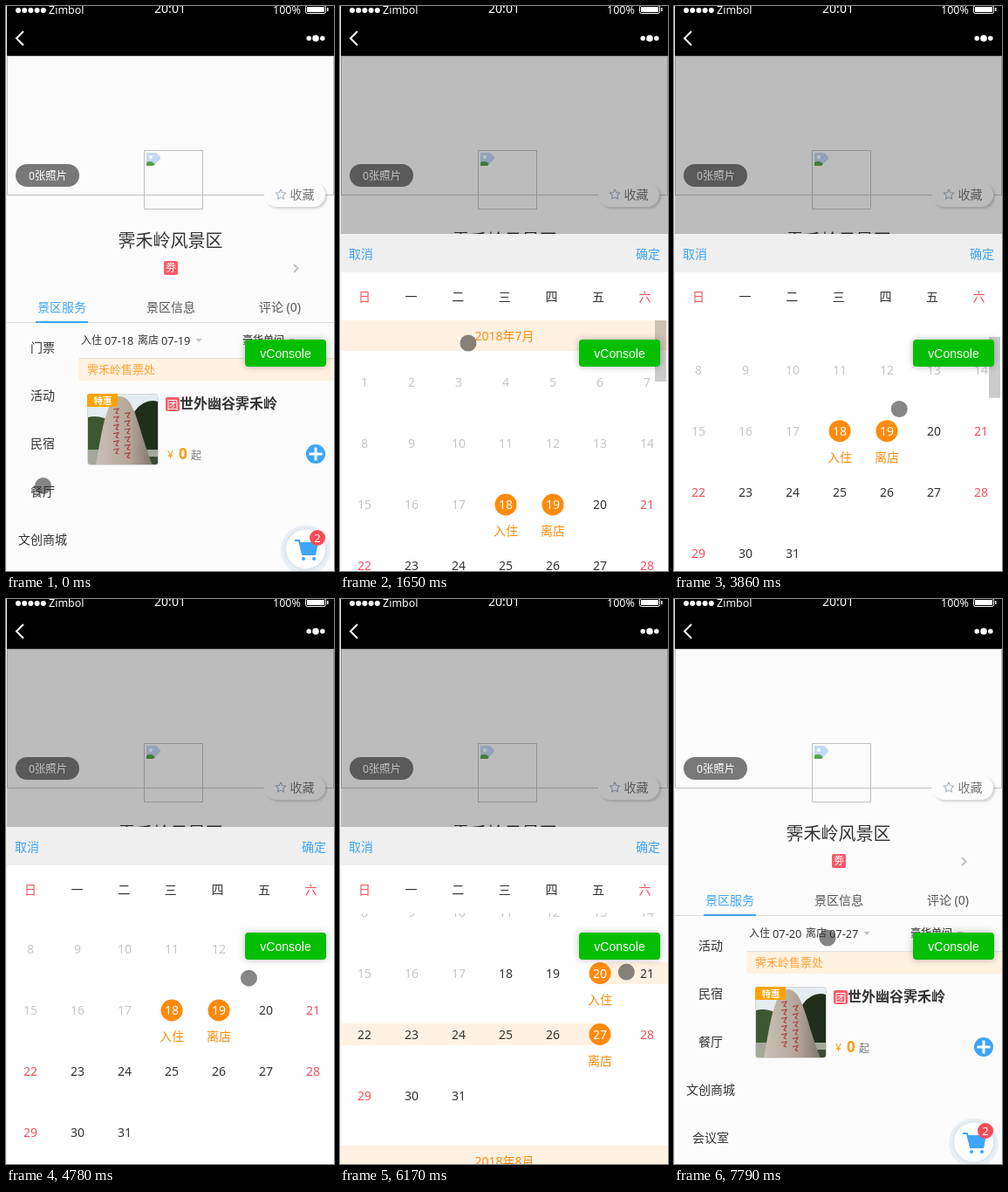
An HTML page with a canvas for the animation above (8 s loop, 376 by 647 pixels).

```html
<!DOCTYPE html>
<html lang="zh">
<head>
<meta charset="utf-8">
<style>
html, body { margin: 0; width: 100%; height: 100%; overflow: hidden; background: #fbfbfb; }
canvas { display: block; }
</style>
</head>
<body>
<canvas id="stage" width="376" height="647"></canvas>
<script>
const W = 376, H = 647, LOOP = 8000;
const OPEN = 1650, CLOSE = 7210, PICK_START = 5084, PICK_END = 5540;
const c = document.getElementById('stage').getContext('2d');
const SANS = '"Noto Sans", "Noto Sans CJK SC", "Noto Sans CJK", sans-serif';
const BLUE = '#3ea5fa', ORANGE = '#ff8a0c', RED = '#f4505a', PEACH = '#fff1e2', PAGE = '#fbfbfb';

// Each move: start and end time, then the place reached
const moves = [
  { from: 140, to: 560, at: [44, 498] },
  { from: 560, to: 1100, at: [147, 386] },
  { from: 2072, to: 2890, at: [177, 571] },
  { from: 2890, to: 3310, at: [262, 578] },
  { from: 3450, to: 4500, at: [256, 393] },
  { from: 4640, to: PICK_START, at: [298, 470] },
  { from: 5236, to: PICK_END, at: [302, 540] },
  { from: PICK_END, to: 5810, at: [304, 585] },
  { from: 5810, to: 6930, at: [349, 293] },
  { from: 7350, to: 7790, at: [176, 388] },
];

const easeOut = p => 1 - (1 - p) ** 2;
const progress = (t, from, to) => easeOut(Math.min(1, Math.max(0, (t - from) / (to - from))));

const pointerAt = t => moves.reduce(([x, y], m) => {
  const p = progress(t, m.from, m.to);
  return [x + (m.at[0] - x) * p, y + (m.at[1] - y) * p];
}, [42.5, 549.5]);
const menuScroll = t => 49 * progress(t, 140, 640);
const monthScroll = t => 100 * progress(t, 3450, 4130) + 50 * progress(t, 5810, 6400);

function text(s, x, y, size, color, align = 'left', weight = 400, family = SANS) {
  c.font = `${weight} ${size}px ${family}`;
  c.textAlign = align;
  c.fillStyle = color;
  c.fillText(s, x, y + size * 0.37);
}
const label = (s, x, y, color = '#333', size = 14) => text(s, x, y, size, color, 'center');

function rect(x, y, w, h, color) {
  c.fillStyle = color;
  c.fillRect(x, y, w, h);
}
function round(x, y, w, h, r, color) {
  c.beginPath();
  c.roundRect(x, y, w, h, r);
  c.fillStyle = color;
  c.fill();
}
function oval(x, y, rx, ry, color) {
  c.beginPath();
  c.ellipse(x, y, rx, ry, 0, 0, Math.PI * 2);
  c.fillStyle = color;
  c.fill();
}
const disc = (x, y, r, color) => oval(x, y, r, r, color);

function poly(points, color) {
  c.beginPath();
  points.forEach(([x, y]) => c.lineTo(x, y));
  c.fillStyle = color;
  c.fill();
}
function line(points, color, width = 1) {
  c.beginPath();
  points.forEach(([x, y]) => c.lineTo(x, y));
  c.strokeStyle = color;
  c.lineWidth = width;
  c.stroke();
}
function frameBox(x, y, w, h, color, r = 0) {
  c.beginPath();
  c.roundRect(x + 0.5, y + 0.5, w - 1, h - 1, r);
  c.strokeStyle = color;
  c.lineWidth = 1;
  c.stroke();
}
function raised(color, blur, offset, draw) {
  c.save();
  c.shadowColor = color;
  c.shadowBlur = blur;
  c.shadowOffsetX = c.shadowOffsetY = offset;
  draw();
  c.restore();
}
function clipped(x, y, w, h, draw) {
  c.save();
  c.beginPath();
  c.rect(x, y, w, h);
  c.clip();
  draw();
  c.restore();
}
function chevron(x, y, w, h, color, width) {
  line([[x + w, y - h], [x, y], [x + w, y + h]], color, width);
}

function topBar() {
  rect(0, 0, W, 57, '#000');
  for (let i = 0; i < 5; i++) disc(14 + i * 7.2, 5, 3, '#fff');
  text('Zimbol', 49, 4, 12.5, '#fff');
  label('20:01', 188, 3, '#fff');
  text('100%', 306, 4, 12.5, '#fff');
  frameBox(343, -1, 24, 10, '#fff', 2);
  rect(345, 1, 20, 6, '#fff');
  rect(368, 2, 1.5, 4, '#fff');
  chevron(12, 37, 8, 8, '#fff', 2);
  for (let i = -1; i <= 1; i++) disc(355 + i * 7.8, 37, i ? 2.8 : 3.8, '#fff');
}

function brokenImage() {
  frameBox(158, 165, 68, 68, '#c0c0c0');
  clipped(161, 168, 16, 15, () => {
    rect(161, 168, 16, 15, '#c4d8f5');
    disc(166, 173, 2, '#fff');
    oval(165, 183, 6, 5, '#55a548');
    poly([[172, 168], [177, 168], [177, 173]], PAGE);
    poly([[177, 175], [177, 183], [169, 183]], PAGE);
  });
}

function star(x, y, r) {
  c.beginPath();
  for (let i = 0; i < 10; i++) {
    const a = -Math.PI / 2 + i * Math.PI / 5, k = i % 2 ? r * 0.5 : r;
    c.lineTo(x + k * Math.cos(a), y + k * Math.sin(a));
  }
  c.closePath();
  c.strokeStyle = '#a3b3c8';
  c.lineWidth = 1.1;
  c.stroke();
}

function photo() {
  clipped(94, 445, 80, 80, () => {
    rect(93, 444, 82, 82, '#e4ecf0');
    oval(102, 492, 26, 22, '#3c5732');
    oval(168, 490, 28, 38, '#202f1c');
    rect(93, 508, 82, 18, '#a3a89a');
    oval(168, 528, 26, 12, '#3b4a32');
    const stone = c.createLinearGradient(105, 0, 168, 0);
    stone.addColorStop(0, '#c9bfb3');
    stone.addColorStop(0.6, '#b3a498');
    stone.addColorStop(1, '#7f766d');
    c.beginPath();
    c.moveTo(103, 526);
    c.bezierCurveTo(108, 500, 114, 447, 130, 447);
    c.bezierCurveTo(148, 447, 150, 480, 168, 526);
    c.fillStyle = stone;
    c.fill();
    for (let i = 0; i < 12; i++) {
      const x = i % 2 ? 139 : 126, y = 462 + i * 4.6;
      line([[x - 3, y], [x + 3, y - 1], [x, y + 4], [x + 3, y + 5]], '#b04440', 1.2);
    }
  });
  frameBox(93, 444, 82, 82, '#d5d8d8', 3);
  round(93, 444, 35, 15, [3, 0, 3, 0], '#ffa200');
  text('特惠', 111, 452, 10.5, '#fff', 'center', 700);
}

function cart() {
  disc(343.5, 623, 28.5, '#eaf0f6');
  raised('rgba(90,120,160,.25)', 4, 0, () => disc(343.5, 622, 22.5, '#fff'));
  line([[331, 612], [336, 612], [340, 628], [355, 628]], BLUE, 2);
  poly([[336, 614], [358, 614], [355, 629], [340, 629]], BLUE);
  for (const x of [341, 353]) disc(x, 633, 2, BLUE);
  disc(357, 609, 9, '#fb4b54');
  label('2', 357, 609, '#fff', 13);
}

function menu(t) {
  const y = menuScroll(t), shaded = t >= 140 && t < OPEN;
  clipped(1, 366, 82, H - 366, () => {
    if (shaded) {
      rect(1, 366, 82, H, '#efefef');
      rect(1, 473 - y, 82, 55, '#fff');
    }
    ['门票', '活动', '民宿', '餐厅', '文创商城', '会议室'].forEach((s, i) =>
      label(s, 42, 391 + i * 55 - y));
  });
}

function hero() {
  frameBox(1, 57, 375, 160, '#c3c3c0');
  brokenImage();
  round(11, 181, 73, 26, 13, 'rgba(0,0,0,.52)');
  label('0张照片', 48, 194.5, '#fff', 12.3);
  raised('rgba(0,0,0,.17)', 3, 2, () => round(296, 202, 70, 28, 14, PAGE));
  star(315, 216, 6);
  text('收藏', 325.5, 216, 14, '#777');

  label('霁禾岭风景区', 188.5, 269, '#333', 20);
  round(181, 292, 16, 16, 2, '#fb5a68');
  label('劵', 189, 300, '#fff', 12);
  chevron(334.5, 300.5, -4.5, 4.5, '#bdbdbd', 1.8);
}

function tabs() {
  ['景区服务', '景区信息', '评论 (0)'].forEach((s, i) =>
    label(s, 64 + i * 125, 345, i ? '#555' : BLUE));
  rect(1, 362, 375, 1, '#dcdcdc');
  rect(34, 361, 60, 2, BLUE);
}

function filters(t) {
  const dates = t < CLOSE ? [18, 19] : [20, 27];
  dates.forEach((d, i) => {
    text(i ? '离店' : '入住', 86 + i * 65, 383, 12, '#333');
    text(`07-${d}`, 113 + i * 65, 383, 12.8, '#333');
  });
  text('豪华单间', 271, 383, 12, '#333');
  for (const x of [221, 328]) poly([[x - 3.5, 381], [x + 3.5, 381], [x, 385]], '#c4c4c4');
  rect(83, 403, 293, 1, '#e2e2e2');
}

function product() {
  rect(83, 404, 293, 25, '#fff2e1');
  text('霁禾岭售票处', 93, 416.5, 13, '#ffa02f');
  photo();
  round(183, 448, 16, 16, 2, '#fb5a68');
  label('团', 191, 456, '#fff', 13);
  text('世外幽谷霁禾岭', 199, 455, 16, '#333', 'left', 700);
  text('¥', 185, 514, 12, '#ff9d0a');
  text('0', 198, 513, 17, '#ff9d0a', 'left', 700);
  text('起', 212, 514.5, 12, '#777');
  disc(355, 513, 11, BLUE);
  rect(347.5, 511.5, 15, 3, '#fff');
  rect(353.5, 505.5, 3, 15, '#fff');
}

function page(t) {
  rect(0, 57, W, H, PAGE);
  hero();
  tabs();
  menu(t);
  filters(t);
  product();
  cart();
}

function picked(t) {
  if (t < PICK_START) return [18, 19];
  return t < PICK_END ? [20] : [20, 27];
}

function days(top, t) {
  const [start, end] = picked(t);
  for (let d = 1; d <= 31; d++) {
    const col = (d - 1) % 7, x = 28 + col * 54, y = top + 71 + Math.floor((d - 1) / 7) * 70;
    if (end - start > 1 && d >= start && d <= end) {
      const left = d === start ? x : col ? x - 27 : 1;
      const right = d === end ? x : col < 6 ? x + 27 : W;
      rect(left, y - 12.5, right - left, 25, PEACH);
    }
    const mark = d === start ? '入住' : d === end ? '离店' : '';
    const inside = d > start && d < end;
    let color = d < 18 ? '#c6c6c6' : !inside && col % 6 === 0 ? RED : '#333';
    if (mark) {
      disc(x, y, 12.5, ORANGE);
      label(mark, x, y + 30, ORANGE);
      color = '#fff';
    }
    label(d, x, y, color);
  }
}

function monthBar(s, y) {
  rect(1, y, 375, 35, PEACH);
  label(s, 188.5, y + 18, ORANGE);
}

function calendar(t) {
  rect(0, 57, W, H, 'rgba(0,0,0,.25)');
  rect(0, 261, W, H, '#fff');
  rect(0, 261, W, 44, '#efefef');
  text('取消', 10, 284, 14, BLUE);
  text('确定', 367, 284, 14, BLUE, 'right');
  [...'日一二三四五六'].forEach((s, i) => label(s, 28 + i * 53.6, 333, i % 6 ? '#333' : RED));

  const scroll = monthScroll(t);
  clipped(1, 360, 375, H - 360, () => {
    const top = 360 - scroll;
    monthBar('2018年7月', top);
    days(top, t);
    monthBar('2018年8月', top + 408);
    if (t < 4500) rect(361, 360 + scroll * 0.224, 13, 70, 'rgba(0,0,0,.2)');
  });
}

function consoleButton() {
  raised('rgba(0,0,0,.28)', 8, 0, () => round(274, 382, 93, 31, 4, '#04be02'));
  text('vConsole', 320.5, 398, 14, '#fff', 'center', 400, '"Liberation Sans", Arial, sans-serif');
}

function draw(t) {
  c.clearRect(0, 0, W, H);
  page(t);
  if (t >= OPEN && t < CLOSE) calendar(t);
  topBar();
  rect(0, 0, 1, H, '#efeee2');
  consoleButton();
  disc(...pointerAt(t), 9.5, 'rgba(40,40,40,.56)');
}

const begin = performance.now();
function tick() {
  draw((performance.now() - begin) % LOOP);
  requestAnimationFrame(tick);
}
tick();
</script>
</body>
</html>
```
